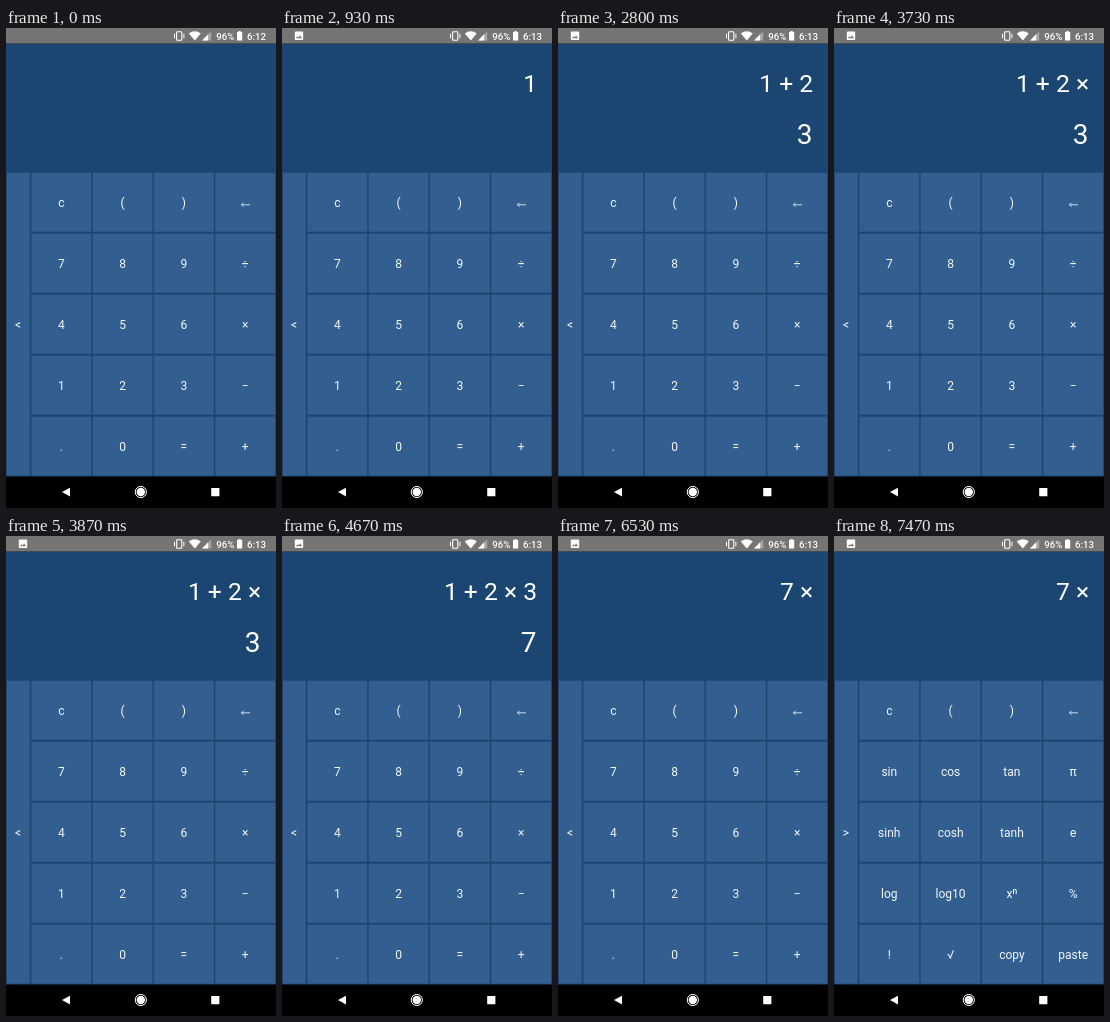
Animation of 270 by 480 pixels, one loop 8000 ms. Source, as an HTML page:

```html
<!DOCTYPE html>
<html lang="en">
<head>
<meta charset="utf-8">
<title>Calculator</title>
<style>
  html, body { margin: 0; width: 100%; height: 100%; overflow: hidden; background: #000; }
  svg { display: block; width: 270px; height: 480px; font-family: Roboto, sans-serif; fill: #fff; }
  .key { fill: #325f90; }
  .label { font-size: 12px; text-anchor: middle; fill: #f4f7fa; }
  .status { font-size: 9.6px; font-weight: 500; text-anchor: end; }
  .out { text-anchor: end; }
  .line { fill: none; stroke: #f4f7fa; }
</style>
</head>
<body>
<svg viewBox="0 0 270 480">
  <rect width="270" height="480" fill="#000"/>
  <rect y="15.5" width="270" height="433" fill="#1b4672"/>
  <rect width="270" height="15.5" fill="#757575"/>

  <!-- status bar -->
  <path id="picture" fill-rule="evenodd" d="M13.8 3.5h6.4q1 0 1 1v6.4q0 1-1 1h-6.4q-1 0-1-1V4.500q0-1 1-1zM13.900 10.300h6.200l-2-2.700-1.600 2-1.100-1.300z"/>
  <rect x="170.600" y="3.700" width="5.200" height="8.600" rx=".8" fill="none" stroke="#fff" stroke-width="1.100"/>
  <path d="M168.500 5.800v4.400M177.900 5.800v4.400" stroke="#fff"/>
  <path d="M182.800 5.500Q188.800 1.200 194.800 5.500L188.800 12.600z"/>
  <path d="M205.200 3.300v9.200H196z" opacity=".35"/>
  <path d="M202.200 6.300v6.200H196z"/>
  <path d="M232.500 3.900v-.9h2.200v.9h1.500v8.700h-5.200V3.900z"/>
  <text class="status" x="228.300" y="11.600">96%</text>
  <text class="status" id="clock" x="260" y="11.600"></text>

  <!-- display -->
  <text class="out" id="expr" x="255.200" y="64" font-size="24.700"></text>
  <text class="out" id="result" x="254.600" y="116" font-size="28"></text>

  <g id="pad"></g>

  <!-- navigation bar -->
  <path d="M64 459.800v8.600l-8-4.300z"/>
  <circle cx="134.800" cy="464" r="5.600" fill="none" stroke="#fff" stroke-width="1"/>
  <circle cx="134.800" cy="464" r="4.200"/>
  <rect x="205.200" y="460" width="8.200" height="8.200" rx=".5"/>
</svg>
<script>
const LOOP = 8000;
// start time, clock, expression, result, keypad page
const STEPS = [
  [0, '6:12', '', '', 0],
  [930, '6:13', '1', '', 0],
  [1870, '6:13', '1 +', '', 0],
  [2800, '6:13', '1 + 2', '3', 0],
  [3730, '6:13', '1 + 2 ×', '3', 0],
  [4670, '6:13', '1 + 2 × 3', '7', 0],
  [5600, '6:13', '7', '', 0],
  [6530, '6:13', '7 ×', '', 0],
  [7470, '6:13', '7 ×', '', 1]
];
const PAGES = [
  '< c ( ) ← 7 8 9 ÷ 4 5 6 × 1 2 3 − . 0 = +',
  '> c ( ) ← sin cos tan π sinh cosh tanh e log log10 xⁿ % ! √ copy paste'
].map(page => page.split(' '));

const $ = id => document.getElementById(id);

function add(tag, attrs) {
  const el = document.createElementNS('http://www.w3.org/2000/svg', tag);
  for (const name in attrs) el.setAttribute(name, attrs[name]);
  return $('pad').appendChild(el);
}

function addKey(x, y, width, height, labelX, labelY) {
  add('rect', { class: 'key', x, y, width, height });
  return add('text', { class: 'label', x: labelX, y: labelY + 4.2 });
}

const labels = [addKey(1, 144.7, 22.8, 302.9, 12, 297)];
for (let i = 0; i < 20; i++) {
  const x = 25.4 + (i % 4) * 61.3, y = 144.7 + Math.floor(i / 4) * 61;
  labels.push(addKey(x, y, 59.8, 59, x + 29.9, y + 30.3));
}
add('path', { class: 'line', d: 'M244 176.800h-8.500M237.500 174.800l-2 2 2 2', 'stroke-width': .8 });

let shown = -1;
function render(time) {
  const t = time % LOOP;
  const index = STEPS.filter(step => step[0] <= t).length - 1;
  if (index !== shown) {
    shown = index;
    const [, clock, expr, result, page] = STEPS[index];
    $('clock').textContent = clock;
    $('expr').textContent = expr;
    $('result').textContent = result;
    $('picture').style.display = index ? '' : 'none';
    labels.forEach((label, i) => {
      const text = PAGES[page][i];
      label.textContent = text === '←' ? '' : text;
    });
  }
}

const start = performance.now();
function tick() {
  render(performance.now() - start);
  requestAnimationFrame(tick);
}
tick();
</script>
</body>
</html>
```
